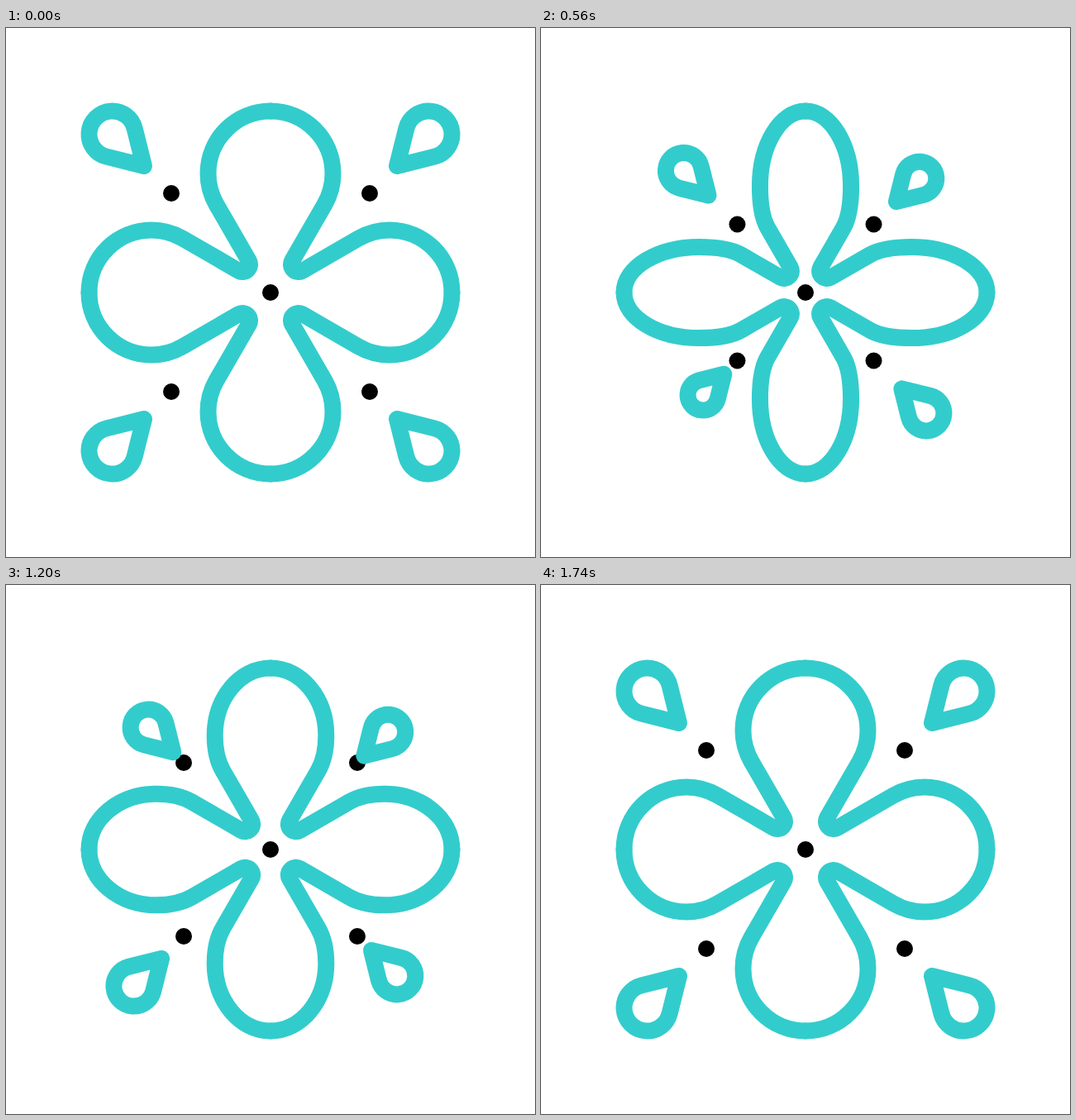
Write an HTML page that moves like this. It is 640x640 px and loops after 2400 ms.

```html
<!DOCTYPE html>
<html lang="en">
<head>
<meta charset="utf-8">
<title>Flower</title>
<style>
  html, body { margin: 0; width: 100%; height: 100%; overflow: hidden; background: #fff; }
  svg { display: block; width: 100%; height: 100%; }
  path { fill: none; stroke: #3cc; stroke-width: 20; stroke-linejoin: round; stroke-linecap: round; }
</style>
</head>
<body>
<svg viewBox="0 0 640 640"><g id="stage" transform="translate(320 320)"></g></svg>
<script>
const LOOP = 2400;
const EDGE = 219.5;     // centre to the outermost stroke line
const FILLET = 9;
const KAPPA = 0.5523;
const COS30 = Math.cos(Math.PI / 6);

const stage = document.getElementById('stage');

function add(tag, attrs = {}) {
  const node = document.createElementNS('http://www.w3.org/2000/svg', tag);
  for (const name in attrs) node.setAttribute(name, attrs[name]);
  return stage.appendChild(node);
}

const turns = [0, 90, 180, 270];
const turned = tag => turns.map(a => add(tag, { transform: `rotate(${a})` }));

const petals = turned('path');
add('circle', { r: 10 });
const dots = turned('circle');
dots.forEach(dot => dot.setAttribute('r', 10));
const drops = turned('path');

// Clockwise from the top left: time of the innermost pose, time of return.
const dropTimes = [[992, 1470], [863, 1728], [972, 1452], [665, 1605]];

const easeSine = x => (1 - Math.cos(Math.PI * x)) / 2;
const easeQuad = x => x < 0.5 ? 2 * x * x : 1 - 2 * (1 - x) ** 2;

function thereAndBack(t, peak, end, ease) {
  if (t >= end) return 0;
  return ease(t < peak ? t / peak : (end - t) / (end - peak));
}

const show = points => points.map(p => p.map(v => v.toFixed(3)).join(' ')).join(' ');
const mirror = points => points.map(([x, y]) => [y, x]).reverse();

// Left half of the top petal, the rounded inner corner, then its mirror image.
function petalPath(p) {
  const w = 75.5 - 24 * p;
  const sideY = -144 + 18 * p;
  const corner = -34 + 9.3 * p;
  const line = 78.3 - 27.4 * p;
  const joint = [corner + FILLET * COS30, corner - FILLET / 2];
  const back = ([x, y], d) => [x - d / 2, y - d * COS30];
  const low = back(joint, line);
  const half = [
    [0, -EDGE], [-w * KAPPA, -EDGE], [-w, sideY - KAPPA * (sideY + EDGE)],
    [-w, sideY], [-w, sideY + 13.25 + 11.5 * p], back(low, 13.25 - 2 * p), low
  ];
  const other = mirror(half);
  return `M${show(half.slice(0, 1))}C${show(half.slice(1))}L${show([joint])}` +
    `A${FILLET} ${FILLET} 0 0 1 ${show(mirror([joint]))}` +
    `L${show(other.slice(0, 1))}C${show(other.slice(1))}`;
}

function dropPath(p) {
  const r = 28 * (1 - 0.36 * p);
  const mid = -EDGE + 81 * p + r;
  const tip = mid + 1.375 * r;
  const touch = [mid + 0.97 * r, mid - 0.243 * r];
  return `M${show([[tip, tip]])}L${show(mirror([touch]))}A${r} ${r} 0 1 1 ${show([touch])}Z`;
}

function draw(t) {
  const p = thereAndBack(t, 750, 1498, easeSine);
  const petal = petalPath(p);
  petals.forEach(node => node.setAttribute('d', petal));
  dots.forEach(dot => {
    dot.setAttribute('cx', -120 + 44 * p);
    dot.setAttribute('cy', -120 + 44 * p);
  });
  drops.forEach((node, i) =>
    node.setAttribute('d', dropPath(thereAndBack(t, ...dropTimes[i], easeQuad))));
}

const start = performance.now();
function tick() {
  draw((performance.now() - start) % LOOP);
  requestAnimationFrame(tick);
}
tick();
</script>
</body>
</html>
```
